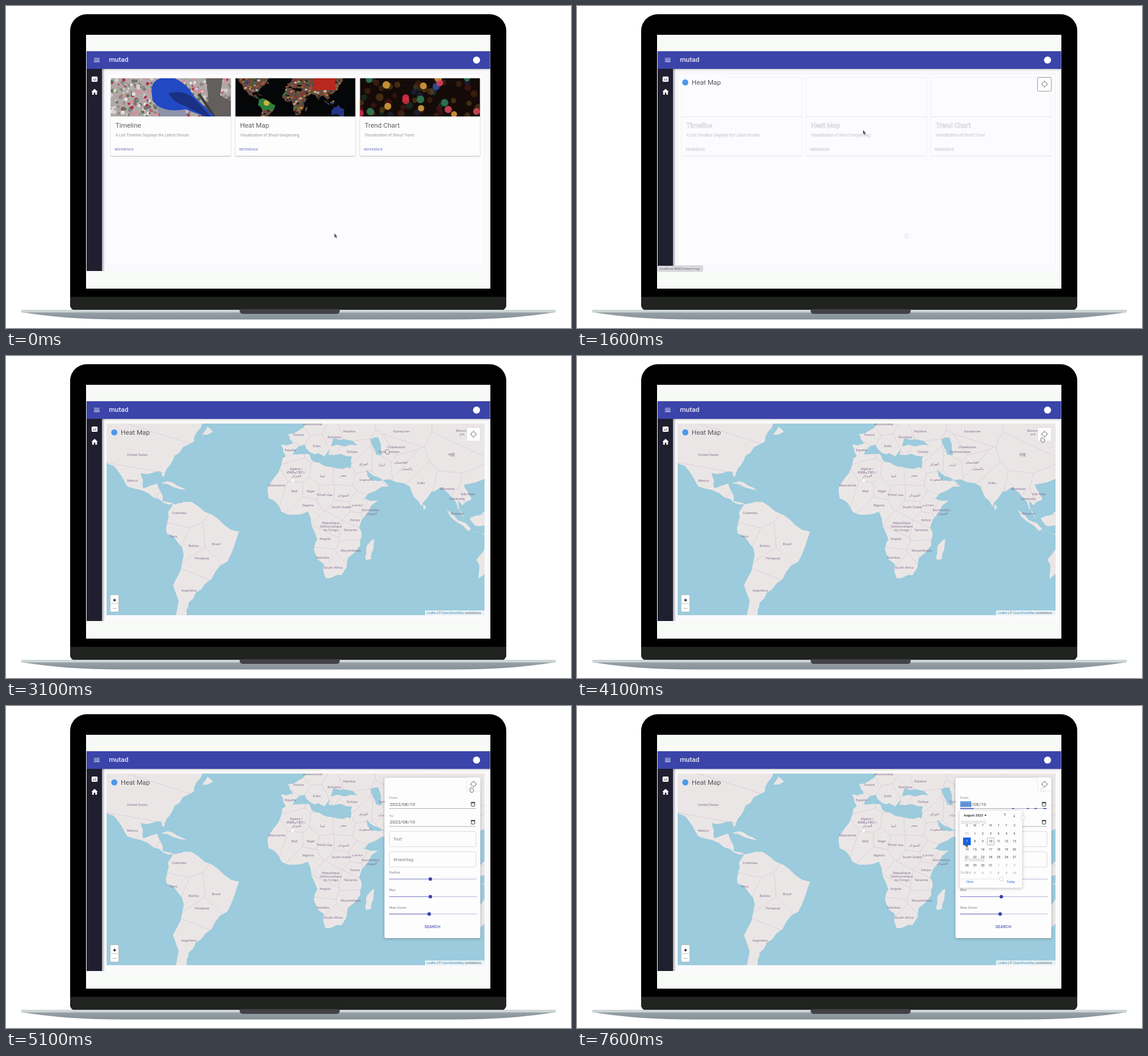
An HTML page with a canvas that plays this animation: 960 px wide and 548 px high, repeating every 8000 ms.

```html
<!DOCTYPE html>
<html lang="en">
<head>
<meta charset="utf-8">
<title>mutad</title>
<style>
html, body { margin: 0; width: 100%; height: 100%; overflow: hidden; background: #fff; }
canvas { display: block; }
</style>
</head>
<body>
<canvas id="stage" width="960" height="548"></canvas>
<script>
const c = document.getElementById('stage').getContext('2d');
const LOOP = 8000, INDIGO = '#3b44a9', LAND = '#ebe6e6', SEA = '#9bcbdc';

// Key points of each coast; rough() fills in the detail between them
const coasts = {
  northAmerica: '100,40 345,40 334,114 319,146 286,170 273,192 267,206 262,196 229,199 233,225 257,217 266,247 285,252 251,241 206,222 184,188 170,180',
  newfoundland: '333,134 342,120 352,129',
  cuba: '264,216 274,213 306,228 284,223',
  southAmerica: '274,282 284,252 302,248 350,270 396,299 376,350 338,388 310,420 305,445 288,445 302,338 273,302',
  africa: '470,174 515,167 520,178 545,188 581,189 606,243 632,246 600,292 602,322 570,373 543,378 525,335 529,312 513,265 468,265 446,242 448,218',
  madagascar: '626,311 620,346 611,346 612,326',
  eurasia: '467,151 487,150 479,133 510,115 520,40 900,40 845,180 778,219 791,243 776,254 768,246 779,276 760,242 742,223 723,231 706,256 686,222 640,211 612,193 622,213 640,211 651,222 608,244 583,194 588,171 548,168 552,154 598,152 578,142 556,140 541,171 513,144 535,163 524,167 508,151 490,161 477,175',
  sumatra: '749,262 790,294 785,298',
  borneo: '788,276 820,258 813,288 796,288',
  java: '787,298 830,304 813,305',
  australia: '799,347 850,300 895,335 890,390 850,370 803,379',
  sriLanka: '709,252 714,258 710,262',
};
const caspianSea = '619,141 632,138 639,168 629,168';

const labels = [
  ['Canada', 250, 82], ['United States', 223, 168], ['México', 215, 212], ['Colombia', 294, 267], ['Perú', 285, 307],
  ['Bolivia', 319, 323], ['Brasil', 357, 320], ['Paraguay', 333, 344], ['Argentina', 311, 399],
  ['Deutschland', 521, 116], ['France', 497, 134], ['España', 483, 160], ['Italia', 528, 153], ['România', 558, 138],
  ['Україна', 583, 128], ['Türkiye', 588, 163], ['Қазақстан', 672, 128], ['Oʻzbekiston', 663, 155],
  ['Türkmenistan', 651, 163], ['افغانستان', 670, 181], ['ایران', 637, 185], ['پاکستان', 682, 192], ['العراق', 607, 184],
  ['السعودية', 611, 210], ['مصر', 573, 203], ['ليبيا', 539, 204], ['السودان', 572, 237],
  ['Algérie /\nⵍⵣⵣⴰⵢⴻⵔ /\nالجزائر', 493, 198], ['Mauritanie', 460, 220], ['Mali', 490, 230], ['Niger', 518, 230],
  ['Tchad تشاد', 543, 236], ['Nigeria', 513, 254], ['South Sudan', 570, 257], ['ኢትዮጵያ', 597, 254],
  ['Soomaaliya\nالصومال', 619, 265], ['Kenya', 593, 279], ['République\nDémocratique\ndu Congo', 552, 290],
  ['Tanzania', 585, 296], ['Angola', 542, 311], ['Moçambique', 586, 331], ['Namibia', 538, 343],
  ['South Africa', 556, 360], ['India', 705, 216], ['中国', 757, 168], ['Монгол\nулс', 775, 130], ['Myanmar', 750, 226],
  ['Việt Nam', 785, 235], ['Cambodia', 766, 243], ['Malaysia', 767, 268],
];

const cards = [
  ['Timeline', 'A List Timeline Displays the Latest Shouts', birdPhoto],
  ['Heat Map', 'Visualization of Shout Geoparsing', flagPhoto],
  ['Trend Chart', 'Visualization of Shout Trend', lightsPhoto],
].map(([title, note, photo], i) => ({ title, note, photo, x: 178 + 211.7 * i }));

// trace: until when a faint trace stays after the cursor has left
const cursorTrack = [
  { at: 0, x: 560, y: 391, trace: 2100 },
  { at: 100, x: 488, y: 215, hand: true },
  { at: 1600, x: 488, y: 215 },
  { at: 2100, x: 487, y: 212, hand: true, trace: LOOP },
  { at: 3100, x: 648, y: 163, hand: true },
  { at: 3600, x: 760, y: 143, hand: true },
  { at: 4100, x: 791, y: 143, hand: true, trace: LOOP },
  { at: 5600, x: 794, y: 174 },
  { at: 6600, x: 757, y: 190, trace: LOOP },
  { at: 7100, x: 662, y: 237 },
];

function random(seed) {
  return () => (seed = seed * 16807 % 2147483647) / 2147483647;
}
function polygon(points) {
  return new Path2D(`M${points.join(' ')}z`);
}
// Splits every edge twice, pushing each midpoint sideways
function rough(outline, rnd) {
  let points = outline.split(' ').map(pair => pair.split(',').map(Number));
  for (let pass = 0; pass < 2; pass++)
    points = points.flatMap(([x, y], i) => {
      const [u, v] = points[(i + 1) % points.length], push = (rnd() - .5) * .28;
      return [[x, y], [(x + u) / 2 + (v - y) * push, (y + v) / 2 - (u - x) * push]];
    });
  return polygon(points);
}
// The part of the world nearer to this label than to any other
function country([, x, y]) {
  let cell = [[0, 0], [960, 0], [960, 548], [0, 548]];
  for (const [, u, v] of labels) {
    if (u === x && v === y) continue;
    const side = ([px, py]) => (px - (x + u) / 2) * (u - x) + (py - (y + v) / 2) * (v - y);
    cell = cell.flatMap((p, i) => {
      const q = cell[(i + 1) % cell.length], a = side(p), b = side(q), k = a / (a - b);
      const kept = a <= 0 ? [p] : [];
      return a * b < 0 ? [...kept, [p[0] + (q[0] - p[0]) * k, p[1] + (q[1] - p[1]) * k]] : kept;
    });
  }
  return polygon(cell);
}

const shoreRandom = random(7);
const lands = Object.values(coasts).map(outline => rough(outline, shoreRandom));
const caspian = rough(caspianSea, shoreRandom);
const world = new Path2D();
lands.forEach(path => world.addPath(path));
const countries = labels.map(country);

function rect(x, y, w, h, color) {
  c.fillStyle = color;
  c.fillRect(x, y, w, h);
}
function dot(x, y, r, color) {
  c.fillStyle = color;
  c.beginPath();
  c.arc(x, y, r, 0, 7);
  c.fill();
}
function shape(d, color) {
  c.fillStyle = color;
  c.fill(new Path2D(d));
}
function line(d, color, width = 1) {
  c.strokeStyle = color;
  c.lineWidth = width;
  c.stroke(new Path2D(d));
}
function box(x, y, w, h, r, { fill, stroke, shadow = 0 }) {
  c.save();
  c.beginPath();
  c.roundRect(x, y, w, h, r);
  if (shadow) { c.shadowColor = 'rgba(0,0,0,.28)'; c.shadowBlur = shadow; c.shadowOffsetY = 1; }
  if (fill) { c.fillStyle = fill; c.fill(); }
  if (stroke) { c.lineWidth = 1; c.strokeStyle = stroke; c.stroke(); }
  c.restore();
}
function setFont(size, weight, align, family) {
  c.font = `${weight} ${size}px ${family}, sans-serif`;
  c.textAlign = align;
  c.textBaseline = 'middle';
}
function text(s, x, y, size, color, { weight = 400, align = 'left', family = 'Roboto' } = {}) {
  setFont(size, weight, align, family);
  c.fillStyle = color;
  c.fillText(s, x, y + .5);
}
function ghostText(s, x, y, size) {
  setFont(size, 400, 'left', 'Roboto');
  c.lineWidth = size / 12;
  c.strokeStyle = '#bcbcc2';
  c.strokeText(s, x, y + .5);
  c.fillStyle = '#fdfdfe';
  c.fillText(s, x, y + .5);
}
function clipped(path, paint) {
  c.save();
  c.clip(path);
  paint();
  c.restore();
}
function area(x, y, w, h) {
  const path = new Path2D();
  path.rect(x, y, w, h);
  return path;
}
// Seeded spots over a card photo
function scatter(seed, count, tones, minSize, maxSize, draw) {
  const rnd = random(seed);
  for (let i = 0; i < count; i++)
    draw(rnd() * 204, 123 + rnd() * 65, minSize + rnd() * (maxSize - minSize), tones[rnd() * tones.length | 0]);
}

// Photos are drawn from the left edge of their card
function birdPhoto() {
  rect(0, 123, 204, 65, '#b0a8a7');
  scatter(11, 420, ['#d5d0cf', '#8b8784', '#b0304b', '#d98c99', '#e6e1e1', '#5b7d52', '#a9a09f', '#77726f'], 1, 3.5, dot);
  shape('M162 123H190L186 152 204 162V188H152L166 160z', '#625f5d');
  line('M150 150 176 188', '#423e3e', 4);
  shape('M69 143Q71 124 90 122H106Q130 132 140 152L176 188H160L127 176Q84 184 71 160z', '#2149c4');
  shape('M98 148Q128 142 144 160L170 188H161L126 170Q106 164 98 148z', '#1a3080');
  shape('M76 168Q97 182 126 176L130 188H84z', '#8d93a8');
}
function flagPhoto() {
  rect(0, 123, 204, 65, '#050608');
  c.save();
  c.translate(-25, 103);
  c.scale(.235, .22);
  c.clip(world);
  c.setTransform(c.getTransform().multiply(new DOMMatrix([1 / .235, 0, 0, 1 / .22, 25 / .235, -103 / .22])));
  rect(0, 123, 204, 65, '#6a4a3c');
  scatter(5, 700, ['#9f2a2c', '#2f7040', '#bd9c3a', '#2c3f80', '#c4c0ba', '#222', '#a85c3a'], 2, 5,
    (x, y, size, color) => rect(x, y, size, size * .7, color));
  rect(36, 153, 32, 24, '#2c803e');
  dot(53, 165, 5, '#c8b43a');
  rect(132, 123, 38, 20, '#b8281f');
  rect(160, 164, 40, 24, '#22358a');
  c.restore();
}
function lightsPhoto() {
  rect(0, 123, 204, 65, '#140b08');
  c.globalAlpha = .6;
  scatter(29, 50, ['#4e2a12', '#561718', '#1c3f2e', '#20294a', '#63441a'], 4, 6.5, dot);
  c.globalAlpha = .85;
  scatter(83, 18, ['#d8304a', '#e0a43c', '#2f8058', '#35509f', '#e0485c'], 5, 6.5, dot);
  c.globalAlpha = 1;
}

function cardText({ x, title, note }, write) {
  write(title, x + 8, 203.5, 11.4, '#5c5c60');
  write(note, x + 8, 220, 6.7, '#98989d');
  write('REFERENCE', x + 6.5, 243.5, 6, '#646cb8');
}
function card(item, lift) {
  box(item.x, 123 - lift, 204, 132 + lift, 2, { fill: '#fdfdfe', shadow: 2 });
  if (lift) cardText(item, ghostText);
  c.save();
  c.translate(0, -lift);
  cardText(item, text);
  c.translate(item.x, 0);
  clipped(area(0, 123, 204, 65), item.photo);
  c.restore();
}
function cardTrace(item) {
  box(item.x - .5, 121.5, 205, 134, 2, { stroke: '#f1f1f4' });
  line(`M${item.x} 188.5h204M${item.x} 255.5h204`, '#e4e4e8');
  cardText(item, ghostText);
}

function heading() {
  dot(184, 130, 5.2, '#4d98ea');
  text('Heat Map', 195, 130, 11.4, '#55555a');
}
function locateButton(border) {
  box(782.5, 121.5, 23.5, 23.5, 2, { fill: '#fdfdfd', stroke: border });
  box(790.3, 129, 8, 8, 4, { stroke: '#8a8a8a' });
  line('M794.3 127v2.5M794.3 136.5v2.5M788.3 133h2.5M797.8 133h2.5', '#8a8a8a');
}
function map() {
  rect(171, 115, 642, 326, SEA);
  clipped(area(171, 115, 642, 326), () => {
    c.fillStyle = LAND;
    lands.forEach(path => c.fill(path));
    clipped(world, () => {
      c.strokeStyle = '#d6c8d4';
      c.lineWidth = .5;
      countries.forEach(path => c.stroke(path));
    });
    c.fillStyle = SEA;
    c.fill(caspian);
    for (const [name, x, y] of labels)
      name.split('\n').forEach((s, i, rows) => text(s, x, y + 6 * (i - (rows.length - 1) / 2), 5.6, '#806a8c',
        { align: 'center', family: '"Noto Sans", "Noto Sans CJK SC", "DejaVu Sans"' }));
  });
  box(177, 406.5, 14.5, 29, 2, { fill: '#fff', stroke: '#b9c2c6' });
  line('M177 421.5h14.5', '#ccc');
  line('M182 415.5h5M184.5 413v5', '#222', 1.3);
  line('M181.5 429.5h6', '#aaa');
  rect(712, 433, 101, 8, 'rgba(255,255,255,.75)');
  let x = 715;
  for (const [s, color] of [['Leaflet', '#4a8ab0'], [' | © ', '#555'], ['OpenStreetMap', '#4a8ab0'], [' contributors', '#555']]) {
    text(s, x, 437, 5.3, color, { family: 'Liberation Sans' });
    x += c.measureText(s).width;
  }
}

function dateField(label, y) {
  text(label, 651, y - 11, 6, '#88888c');
  text('2022/08/10', 652, y, 8.1, '#5a5a5e');
  line(`M651 ${y + 7.5}H798`, '#b0b0b5');
  box(790.5, y - 3, 6, 6.5, 1, { stroke: '#444' });
  rect(790, y - 3.5, 7, 2, '#444');
}
function textField(label, y) {
  box(651.5, y - 13, 147, 26, 2, { stroke: '#dcdce2' });
  text(label, 658, y, 7.8, '#85858a');
}
function slider(label, y, x) {
  text(label, 651, y - 11.5, 6.2, '#808085');
  line(`M651 ${y}H800`, '#b9b8d9', 1.2);
  line(`M651 ${y}H${x}`, '#7c80c6', 1.2);
  dot(x, y, 3, INDIGO);
}
function searchPanel(height) {
  box(643, 122, 163, height, 3, { fill: '#fdfdfe', shadow: 4 });
  clipped(area(643, 122, 163, height), () => {
    dateField('From', 167);
    dateField('To', 197.5);
    textField('Text', 226.5);
    textField('#Hashtag', 261);
    slider('Radius', 294.5, 721);
    slider('Blur', 324.5, 721);
    slider('Max Zoom', 354, 719);
    text('SEARCH', 724.5, 375.5, 7, '#5a62b2', { weight: 500, align: 'center' });
  });
}
function focusDate() {
  rect(651, 162, 19, 10, '#6ea3e4');
  text('2022', 652, 167, 8.1, '#3d5f96');
  line('M651 174.5h23M739 174.5h4M764 174.5h4M777 174.5h5M792 174.5h6', INDIGO, 1.3);
}
function calendar(picked) {
  box(650, 178, 106.5, 131.5, 3, { fill: '#fdfdfe', shadow: 5 });
  ghostText('2022/08/10', 652, 197.5, 8.1);
  ghostText('#Hashtag', 658, 261, 7.8);
  ghostText('Radius', 651, 283, 6.2);
  line('M651 294.5H717', '#e6e6ec');
  box(717.5, 291, 7, 7, 4, { stroke: '#d4d4da' });
  text('August 2022', 657, 186, 5.8, '#222', { weight: 500 });
  shape('M692 185h4l-2 2.5z', '#333');
  line('M727 187v-4M726 184l1-1 1 1M743 185v4M742 188l1 1 1-1', '#555', .8);
  const put = (s, column, y, color) => text(s, 662.5 + column * 13.45, y, 5.2, color, { align: 'center' });
  [...'SMTWTFS'].forEach((day, i) => put(day, i, 203, '#555'));
  for (let i = 0; i < 42; i++) {
    const inAugust = i > 0 && i < 32, day = i === 0 ? 31 : inAugust ? i : i - 31;
    const column = i % 7, y = 217 + 13.4 * Math.floor(i / 7), left = 656 + column * 13.45;
    if (i === picked) rect(left, y - 6.5, 13, 13, '#1561e8');
    else if (i === 10) box(left + .5, y - 6, 12, 12, 1, { fill: '#f8f8f8', stroke: '#bbb' });
    put(day, column, y, i === picked ? '#fff' : inAugust ? '#333' : '#999');
  }
  text('Clear', 667.5, 298.5, 5.4, '#2a6de0', { align: 'center' });
  text('Today', 737, 298.5, 5.4, '#2a6de0', { align: 'center' });
}

function cursor({ x, y, hand }) {
  c.save();
  c.translate(x, y);
  if (hand) {
    const d = 'M-3-1Q-3-4-1-4L2-2.5Q4-2 3.5 1L2 4H-1L-3 1z';
    shape(d, '#fff');
    line(d, '#66666b', .9);
    line('M-1-1V1M1-1V1', '#88888c', .6);
  } else {
    shape('M-2-4V3L-.5 1.8 1 4.5 2 4 1 1.5H3z', '#55555a');
  }
  c.restore();
}
function cursorTraces(t) {
  cursorTrack.forEach(({ x, y, trace }, i) => {
    if (trace && t < trace && t >= cursorTrack[i + 1].at)
      box(x - 3, y - 3.5, 6, 7, 3, { fill: '#fafafa', stroke: '#dcdce0' });
  });
}

function laptop() {
  rect(0, 0, 960, 548, '#fff');
  box(109, 14, 741, 504, [28, 28, 9, 9], { fill: '#000' });
  box(109, 495, 741, 23, [0, 0, 9, 9], { fill: '#212321' });
  const metal = c.createLinearGradient(0, 521, 0, 534);
  metal.addColorStop(0, '#97a1a7');
  metal.addColorStop(1, '#848e96');
  shape('M26 521Q100 533.5 200 533.5H760Q860 533.5 934 521z', metal);
  rect(26, 517, 908, 4.5, '#cdd5d6');
  box(397, 516, 170, 8, [0, 0, 5, 5], { fill: '#424246' });
  rect(136, 49, 687, 432, '#f8faf7');
}
function appFrame() {
  rect(137, 107, 686, 344, '#fafafd');
  box(171, 115, 642, 326, 1, { fill: '#fcfcfe', stroke: '#f2f2f6' });
  const shade = c.createLinearGradient(163, 0, 168, 0);
  shade.addColorStop(0, 'rgba(30,30,50,.4)');
  shade.addColorStop(1, 'rgba(30,30,50,0)');
  rect(163, 107, 5, 344, shade);
  rect(137, 107, 26, 344, '#201f30');
  box(137, 77, 685.5, 30, 0, { fill: INDIGO, shadow: 3 });
  line('M149.5 89h9.5M149.5 91.8h9.5M149.5 94.6h9.5', '#e4e5f4', 1.2);
  text('mutad', 175, 91.5, 11.5, '#ececf8', { weight: 500 });
  dot(799.5, 92, 6, '#fff');
  box(145.5, 120, 10, 9, 1.5, { fill: '#fff' });
  line('M148.5 127v-3M150.5 127v-2M152.5 127v-4', '#55556a');
  shape('M150.5 141 156 146H154.5V151H151.8V147.5H149.2V151H146.5V146H145z', '#fff');
}

function draw(t) {
  laptop();
  appFrame();
  if (t < 1600) {
    cards.forEach((item, i) => card(item, i === 1 && t >= 100 ? 3 : 0));
  } else if (t < 2100) {
    cards.forEach(cardTrace);
    rect(172, 121, 80, 20, '#fcfcfe');
    heading();
    locateButton('#9a9a9e');
  } else {
    map();
    heading();
    if (t >= 4600) searchPanel(t < 5100 ? 97 : 273);
    locateButton(t >= 4600 ? '#ececf0' : '#d5dcdf');
    if (t >= 6100) focusDate();
    if (t >= 6600) calendar(t < 7600 ? 10 : 7);
  }
  if (t >= 600 && t < 2100) {
    box(137.5, 442.5, 76, 9, 1, { fill: '#dcdde2', stroke: '#c2c3c9' });
    text('localhost:8080/tweet/map', 140, 447, 5.8, '#66666c');
  }
  cursorTraces(t);
  cursor(cursorTrack.findLast(({ at }) => t >= at));
}

function tick() {
  draw(performance.now() % LOOP);
  requestAnimationFrame(tick);
}
tick();
</script>
</body>
</html>
```
